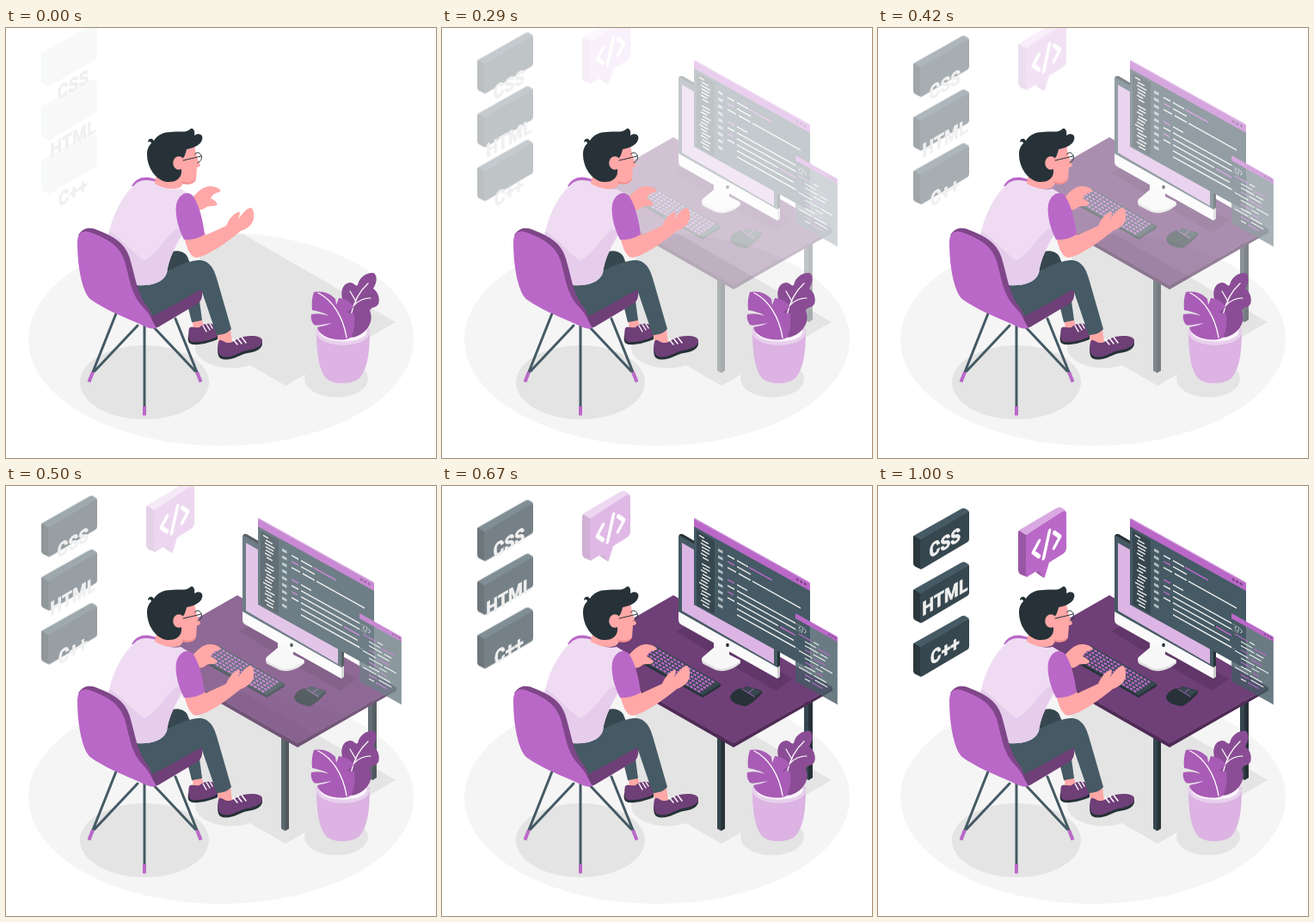
These frames come from a looping animation (500x500 px, 1040 ms). An HTML page:

```html
<!DOCTYPE html>
<html lang="en">
<head>
<meta charset="utf-8">
<title>Programmer at a desk</title>
<style>
  html, body { margin: 0; width: 100%; height: 100%; overflow: hidden; background: #fff; }
  svg { display: block; width: 100vw; height: 100vh; }
  .drop { animation: drop 1040ms linear infinite; }
  .desk { animation: appear 1040ms infinite; }
  @keyframes drop {
    from { opacity: .038; transform: translateY(-29px); }
    96.2%, to { opacity: 1; transform: none; }
  }
  @keyframes appear {
    0% { opacity: 0; animation-timing-function: cubic-bezier(.42, 0, 1, 1); }
    56%, 100% { opacity: 1; }
  }
  .label { font: 700 22px Roboto, Arial, sans-serif; letter-spacing: .3px; fill: #f0f0f0; stroke: #f0f0f0; stroke-width: .8; text-anchor: middle; }
  .line { fill: none; stroke-linecap: round; stroke-linejoin: round; }
  .shade { fill: #e4e4e4; }
  .skin { fill: #ffa8a7; }
  .violet { fill: #ba68c8; }
  .plum { fill: #6f3f77; }
  .ink { fill: #263238; }
  .slate { fill: #455a64; }
  .dark { fill: #37474f; }
</style>
</head>
<body>
<svg viewBox="0 0 500 500" xmlns="http://www.w3.org/2000/svg">
  <defs>
    <g id="sign">
      <path fill="#2a373d" d="M41 59Q41 57 43 58L50 62V97L43 93.500Q41 92 41 90Z"/>
      <path class="slate" d="M42 57.500L97 26.500Q99 25.500 101 26L106 29L49 62.500Z"/>
      <path class="dark" d="M49 64Q49 62 51 61L103 30.500Q106 28.500 106 31V61.500Q106 64 104 65.200L52 96Q49 97.500 49 95Z"/>
    </g>
  </defs>

  <!-- floor -->
  <ellipse cx="250" cy="362" rx="224" ry="124" fill="#f5f5f5"/>
  <path class="shade" d="M276 240L453 342L325 416L225 358V240Z"/>
  <ellipse class="shade" cx="161" cy="412" rx="75" ry="43"/>
  <ellipse class="shade" cx="262" cy="372" rx="42" ry="23.500"/>
  <ellipse class="shade" cx="384" cy="408" rx="37" ry="21.500"/>

  <!-- signs -->
  <g class="drop">
    <use href="#sign"/>
    <use href="#sign" y="62.500"/>
    <use href="#sign" y="125"/>
  </g>
  <g class="label">
    <text transform="matrix(.866 -.5 0 1 78 73.500)">CSS</text>
    <text transform="matrix(.866 -.5 0 1 78 136)">HTML</text>
    <text transform="matrix(.866 -.5 0 1 78 198.500)">C++</text>
  </g>

  <!-- speech bubble -->
  <g class="drop"><g class="drop">
    <path fill="#9a56a6" d="M163 54Q163 51 166 52L174 57V106L166 103Q163 101 163 98Z"/>
    <path fill="#d9a9e1" d="M164 52Q165 50 168 49L206 26.500Q210 24 213 25L218 28L174 58Z"/>
    <path fill="#9a56a6" d="M183 100L188 97L193 107L190 105Z"/>
    <path class="violet" d="M172 61Q172 57 176 54.500L214 30Q219 27 219 32V72Q219 76 215 79L199 89L193.500 107L186 98L176 104Q172 107 172 102Z"/>
    <path class="line" transform="matrix(.866 -.5 0 1 196 68)" stroke="#fff" stroke-width="4.400" d="M-10 -9L-18 0L-10 9M4 -14L-4 14M10 -9L18 0L10 9"/>
  </g></g>

  <!-- desk and computer -->
  <g class="desk">
    <path class="dark" d="M421 250H431V339L426 342L421 339Z"/>
    <path class="ink" d="M426 250H431V339L426 342Z"/>
    <path class="dark" d="M320 288H329V398L324.500 401L320 398.500Z"/>
    <path class="ink" d="M324.500 290H329V398.500L324.500 401Z"/>
    <path fill="#4f2b56" d="M154 193L339 299L454 234V238L339 304L154 198Z"/>
    <path class="plum" d="M269 127L454 234L339 299.500L154 193Z"/>
    <path fill="#613669" d="M272 169L287 160L408 224L388 238L345 213L330 205Z"/>

    <!-- keyboard -->
    <g transform="translate(0 1)">
      <path class="ink" d="M226 199L246 185L324 229V232L303 245L226 202Z"/>
      <path class="dark" d="M226 199L246 184L324 229L303 242.500Z"/>
      <g id="keys" class="line" stroke="#ba68c8" stroke-width="2.300" style="stroke-linecap:butt" stroke-dasharray="3.600 1.500"/>
    </g>

    <!-- mouse -->
    <path class="ink" d="M335 245C338 238 344 235 351 235L354 233L372 238V241L362 251L354 256C347 256 335 252 335 245Z"/>
    <path class="dark" d="M350 236L355 233.500L372 238.500L363 245Z"/>
    <path class="line" stroke="#ba68c8" stroke-width=".9" d="M349 236L363 245M357 240L362 236"/>

    <!-- monitor -->
    <path fill="#dedede" d="M302 201L318 190L347 203V206C338 214 327 217 318 214L304 207Q302 206 302 201Z"/>
    <path fill="#f7f7f7" d="M303 199L316 188V178L334 188V196L346 202Q348 204 344 206C336 212 326 214 319 212L304 204Q301 202 303 199Z"/>
    <path class="ink" d="M275 60Q275 55 280 56L393 122V222L390 224L275 157Z"/>
    <path class="slate" d="M275 61Q275 56 279 59L390 123V212L275 147Z"/>
    <path fill="#dcb5e4" d="M279 66L386 128V207L279 145Z"/>
    <path fill="#fafafa" d="M275 146L390 211V224L278 161Q275 159 275 156Z"/>
    <path fill="#d0d0d0" d="M390 211L393 209V222L390 224Z"/>
    <ellipse class="ink" cx="332" cy="185" rx="1.800" ry="2.300"/>

    <!-- main editor window -->
    <g transform="matrix(1 .556 0 1 293 37)">
      <path class="slate" d="M0 9H135V101H0Z"/>
      <path class="dark" d="M3 13H24V99H3Z"/>
      <path class="violet" d="M0 1Q0 0 2 0H134Q135 0 135 2V10H0Z"/>
      <path fill="#d9a9e1" d="M0 0H134V1H0Z"/>
      <path class="line" stroke="#6f3f77" stroke-width="2.600" d="M120 5h.4M124.500 5h.4M129 5h.4"/>
      <g id="sidebar"/>
      <g id="code"/>
    </g>

    <!-- small window -->
    <g transform="matrix(1 .556 0 1 411 148)">
      <path fill="#455a64" fill-opacity=".8" d="M0 5H49V79H0Z"/>
      <path class="violet" d="M0 1Q0 0 1 0H48Q49 0 49 1V6H0Z"/>
      <path fill="#7d8c93" d="M48 6H49V79H48Z"/>
      <path class="line" stroke="#6f3f77" stroke-width="1.800" d="M39 3h.3M42.500 3h.3M46 3h.3"/>
      <path class="line" stroke="#c9d0d3" stroke-width=".8" d="M6 12L4 14.500L6 17M9 11L7.500 18M10.500 12L12.500 14.500L10.500 17"/>
      <g id="snippet"/>
    </g>
  </g>

  <!-- chair legs -->
  <g class="line" stroke="#455a64" stroke-width="3">
    <path d="M128 332L97 410M153 346L103 399M161 345V448M170 346L220 399M197 338L226 410"/>
    <path stroke="#ba68c8" stroke-width="4" style="stroke-linecap:butt" d="M101 400L96.500 411.500M161 440V450.500M222 400L226.500 411.500"/>
  </g>

  <!-- far leg and shoe -->
  <path class="dark" d="M187 263C195 257 207 258 211 266L216 279L186 288Z"/>
  <path class="slate" d="M209 314L223 302L228 340C224 344 219 344 216 342Z"/>
  <path class="skin" d="M217 342L228 340L231 349L218 352Z"/>
  <path class="ink" d="M212 357L246 352V362C240 365 226 369 217 368C212 367 211 364 212 357Z"/>
  <path class="plum" d="M213 349C215 346 220 349 225 348C230 343 237 343 242 345C247 347 247 355 245 359C238 363 224 366 216 365C211 363 212 354 213 349Z"/>
  <path class="line" stroke="#fff" stroke-width="1.400" d="M229 346L233 353M233 344.500L237 351M237 344L240 349"/>

  <!-- seat -->
  <path class="plum" d="M150 300L226 290L228 304C229 313 227 318 222 321L180 346C174 350 168 350 164 343Z"/>

  <!-- near leg and shoe -->
  <path class="skin" d="M245 354L261 350L263 366L248 368Z"/>
  <path class="ink" d="M246 372L298 365V368C296 375 288 377 281 378C271 380 265 386 255 385.500C247 385 246 381 246 372Z"/>
  <path class="plum" d="M247 365C249 360 252 365 257 366C264 367 267 361 276 359C287 357 297 358 298 363C299 370 290 373 282 374.500C272 376 265 383 255 382.500C246 382 245 373 247 365Z"/>
  <path class="line" stroke="#fff" stroke-width="1.500" d="M264 362L269 368M269 360.500L274 367M274 359.500L279 366"/>
  <path class="slate" d="M148 298C170 297 196 273 223 270C236 269 242 280 245 291L262 350C258 355 251 357 245 357L227 304C208 314 188 327 168 336C160 330 153 315 148 298Z"/>

  <!-- far arm -->
  <path class="skin" d="M213 202C222 190 230 183 239 184C245 185 250 187 249.500 190C245 192 241 192 238 198C243 201 247 203 245 206C240 208 235 206 232 209C228 212 224 212 220 211Z"/>

  <!-- torso -->
  <path class="violet" d="M146 184C152 172 165 171 176 177L168 185Z"/>
  <path fill="#efdcf3" d="M119 244C121 225 133 196 150 182C157 175 168 177 175 179C183 187 196 189 203 187L213 193L207 238C198 252 189 268 187 285C182 297 168 300 152 299L134 265Z"/>
  <path fill="#e6cdec" d="M120 236C136 246 151 265 161 270C174 264 183 247 198 233L206 237C197 252 189 268 187 285C182 297 168 300 152 299L134 265L119 244Z"/>

  <!-- head -->
  <path class="skin" d="M174 174L190 166L204 155L207 141L219 137L222 150L226 160Q225 162 222 162L221 176C219 181 212 182 206 181L203 185C196 189 183 187 173 181Z"/>
  <path fill="#f28f8f" d="M204 178C211 181 217 180 221 175C220 181 213 183 205 181Z"/>
  <path class="ink" d="M165 133C165 130 167 128 170 129L172 131C176 124 184 121 191 121C200 119 209 123 215 117C218 116 220 120 219 125C225 121 230 125 228 130C226 137 216 140 210 141C209 145 208 149 206 151L204 163V167C204 174 198 180 187 179C174 177 164 162 164 147C164 141 166 137 169 134C168 131 166 132 165 133Z"/>
  <ellipse class="skin" cx="201" cy="157" rx="6.800" ry="7.800"/>
  <path class="line" stroke="#263238" stroke-width="1" d="M206 154L227 149M219.500 147C221 144 225 144 227 148C228.500 152 226 156 223 156.500"/>

  <!-- near arm -->
  <path class="skin" d="M207 242L231 238L232 241L256 230C259 223 263 217 270 214C273 213 272 217 270 222C275 216 280 209 285 209C289 212 288 218 288 222C286 230 279 234 273 236C257 249 237 264 222 267C214 267 210 255 207 242Z"/>
  <path class="violet" d="M198 205C201 192 212 188 218 196C225 207 229 224 231 240C223 245 214 247 207 246C201 235 196 218 198 205Z"/>

  <!-- chair back -->
  <path fill="#7f4689" d="M84 241C90 231 99 231 109 236C129 244 139 252 144 268C150 288 152 306 162 321C168 328 171 334 169 341L175 349L162 345L100 250Z"/>
  <path class="violet" d="M83 250C83 238 89 234 99 238C118 245 132 253 138 271C144 292 145 308 158 323C168 333 170 341 175 349C168 351 162 347 155 344C134 335 113 326 99 316C89 309 83 278 83 250Z"/>

  <!-- plant -->
  <path fill="#dcb3e3" d="M361 350C361 376 363 396 372 407C380 415 402 415 411 407C421 395 423 376 423 350Z"/>
  <ellipse fill="#e8d0ed" cx="392" cy="354" rx="31" ry="15"/>
  <ellipse fill="#faf5fb" cx="392" cy="353" rx="27.500" ry="11.500"/>
  <path fill="#8a4d95" d="M397 357C391 343 397 331 392 318C388 307 391 297 400 296C405 296 406 301 409 299C411 289 420 284 428 285C433 290 430 298 427 303C433 307 435 315 433 321C430 326 424 324 423 329C428 340 421 352 411 357C405 360 400 361 397 357Z"/>
  <path class="line" stroke="#fff" stroke-width="1.200" d="M421 297C411 306 404 320 401 334M400 306L407 318M424 314C416 314 409 318 405 322"/>
  <path fill="#a85cb5" d="M358 307C367 305 377 308 383 315L384 322L387 314C395 315 403 319 404 325L396 331L405 332C406 343 405 353 401 360C394 364 380 363 372 359C366 356 363 352 362 348C368 347 374 345 379 343C371 344 362 347 358 345C355 341 354 337 355 333C363 331 371 333 376 335C370 331 362 329 356 328C355 320 356 313 358 307Z"/>
  <path class="line" stroke="#fff" stroke-width="1.300" d="M363 308C379 316 392 335 396 360"/>
</svg>
<script>
  const NS = "http://www.w3.org/2000/svg";
  const WHITE = "#f2f2f2", VIOLET = "#ba68c8", GREY = "#b5bfc4";

  function stroke(id, d, color, width) {
    const path = document.createElementNS(NS, "path");
    path.setAttribute("d", d);
    if (color) path.setAttribute("stroke", color);
    if (width) path.setAttribute("stroke-width", width);
    document.getElementById(id).append(path);
  }
  const row = (id, x, y, length, color, width) => stroke(id, `M${x} ${y}h${length}`, color, width);

  let seed = 11;
  const random = () => (seed = seed * 16807 % 2147483647) / 2147483647;

  for (let i = 0; i < 6; i++) {
    stroke("keys", `M${247 - i * 3.2} ${187.500 + i * 2.2}l70 40.400`);
  }

  for (let i = 0; i < 21; i++) {
    if (i === 7) continue;
    const indent = i % 7 ? 2 + Math.floor(random() * 3) : 0;
    row("sidebar", 6 + indent, 17 + i * 3.9, 6 + random() * 6, WHITE, 1.5);
  }
  for (let i = 0; i < 9; i++) row("sidebar", 28, 21.500 + i * 8, 5.500, GREY, 3.2);

  // x, y, length, violet
  [
    [39, 22, 8, 0], [50, 22, 13, 0], [64, 22, 27, 1],
    [39, 29, 8, 1], [50, 29, 16, 0],
    [39, 36, 10, 0], [52, 36, 14, 0], [68, 36, 56, 0],
    [39, 50, 8, 1], [50, 50, 12, 0],
    [39, 57, 8, 0], [50, 57, 76, 0],
    [39, 64, 7, 1], [50, 64, 76, 0],
    [39, 71, 8, 0], [50, 71, 48, 0], [100, 71, 18, 1],
    [50, 78, 66, 0], [50, 85, 72, 0]
  ].forEach(([x, y, w, violet]) => row("code", x, y, w, violet ? VIOLET : WHITE, 1.6));

  for (let i = 0; i < 11; i++) {
    const x = i % 4 ? 11 : 4, split = 6 + random() * 10;
    const y = 22 + i * 4.8;
    row("snippet", x, y, split, i % 3 ? WHITE : VIOLET, 1.2);
    row("snippet", x + split + 2, y, 6 + random() * 10, i % 3 === 1 ? VIOLET : WHITE, 1.2);
  }
</script>
</body>
</html>
```
